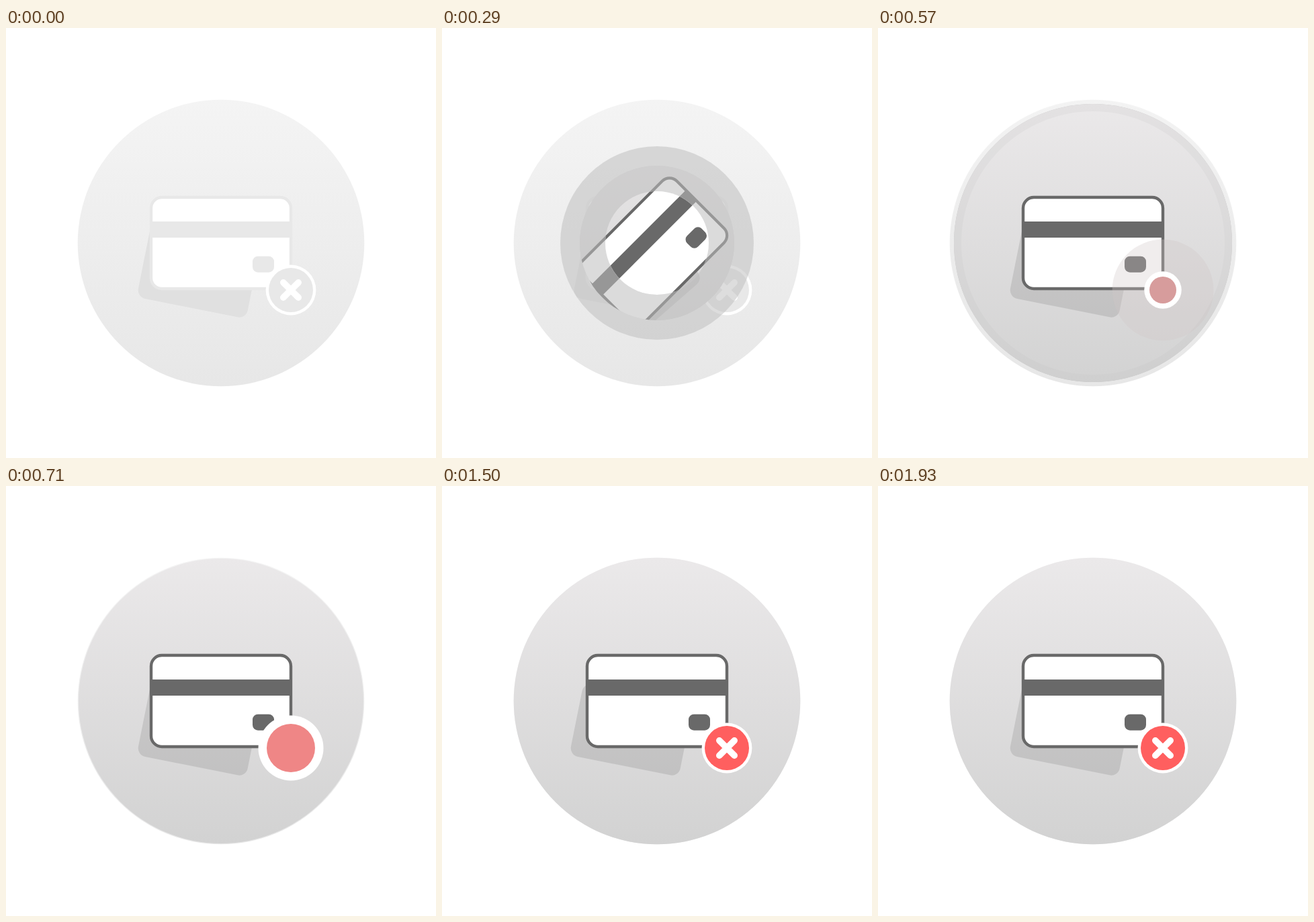
These frames come from a looping animation (640x640 px, 3140 ms). An HTML page:

```html
<!DOCTYPE html>
<html lang="en">
<head>
<meta charset="utf-8">
<title>Card declined</title>
<style>
  html, body { margin: 0; width: 100%; height: 100%; overflow: hidden; background: #fff; }
  svg { display: block; width: 100%; height: 100%; }
</style>
</head>
<body>
<svg viewBox="0 0 640 640">
  <defs>
    <linearGradient id="pale" x2="0" y2="1">
      <stop stop-color="#f4f4f4"/><stop offset="1" stop-color="#e7e7e7"/>
    </linearGradient>
    <linearGradient id="deep" x2="0" y2="1">
      <stop stop-color="#ebe9ea"/><stop offset="1" stop-color="#d2d2d2"/>
    </linearGradient>
    <clipPath id="midClip"><circle id="midClipCircle" cx="320" cy="320"/></clipPath>
    <clipPath id="coreClip"><circle id="coreClipCircle" cx="320" cy="320"/></clipPath>
    <rect id="shadowShape" x="-83" y="-55" width="166" height="110" rx="13"/>
    <g id="cardShape">
      <rect x="-104" y="-68" width="208" height="136" rx="16" fill="#fff" stroke="currentColor" stroke-width="4.4"/>
      <path d="M-104-20h208v24h-208z" transform="translate(0 -12)" fill="currentColor"/>
      <rect x="47" y="19.7" width="32" height="24" rx="8" fill="currentColor"/>
    </g>
    <path id="crossShape" d="M-11.2-11.2 11.2 11.2M11.2-11.2-11.2 11.2" stroke="#fff" stroke-width="9.6" stroke-linecap="round"/>
    <g id="scene">
      <circle cx="320" cy="320" r="213.3" fill="url(#deep)"/>
      <use id="shadow" href="#shadowShape" fill-opacity=".1"/>
      <use id="card" href="#cardShape" color="#696969"/>
      <g transform="translate(424 390)">
        <circle id="halo" fill="#cfc6c6"/>
        <circle id="rim" fill="#fff"/>
        <circle id="dot"/>
        <use id="cross" href="#crossShape"/>
      </g>
    </g>
  </defs>

  <circle cx="320" cy="320" r="213.3" fill="url(#pale)"/>
  <g id="inactive">
    <use href="#shadowShape" transform="translate(286.6 362.7) rotate(11.3)" fill="#e0e0e0"/>
    <use href="#cardShape" transform="translate(320 320)" color="#e8e8e8"/>
    <g transform="translate(424 390)">
      <circle r="37.4" fill="#fff"/><circle r="33" fill="#e8e8e8"/><use href="#crossShape"/>
    </g>
  </g>
  <circle id="outer" cx="320" cy="320" fill="#bebebe"/>
  <circle id="middle" cx="320" cy="320" fill="#bebebe"/>
  <g id="midScene" clip-path="url(#midClip)"><use href="#scene"/></g>
  <g id="coreScene" clip-path="url(#coreClip)"><use href="#scene"/></g>
</svg>
<script>
const LOOP = 3140, FPS = 14;
const RADII = [0, 41, 77, 115, 144, 170, 196, 207, 212, 213.3];
const el = id => document.getElementById(id);
const clamp = (v, lo = 0, hi = 1) => Math.min(hi, Math.max(lo, v));
const set = (id, attrs) => {
  for (const key in attrs) el(id).setAttribute(key, attrs[key]);
};

// Linear interpolation through [step, value] points.
function track(k, ...points) {
  if (k <= points[0][0]) return points[0][1];
  for (let i = 1; i < points.length; i++) {
    const [a, from] = points[i - 1], [b, to] = points[i];
    if (k <= b) return from + (to - from) * (k - a) / (b - a);
  }
  return points[points.length - 1][1];
}

const ripple = k => RADII[clamp(k, 0, RADII.length - 1)];
const pulse = (k, peak, height) => height * clamp(1 - Math.abs(k - peak) / 2);
const place = (x, y, angle, scale) => `translate(${x} ${y}) rotate(${angle}) scale(${scale})`;

function drawRipples(k) {
  const outer = ripple(k), middle = ripple(k - 1), core = ripple(k - 2);
  const spreading = k < 10;
  set("outer", { r: outer, opacity: spreading ? clamp(0.65 - 0.125 * (k - 3)) : 0 });
  set("middle", { r: middle, opacity: spreading ? 1 : 0 });
  set("midClipCircle", { r: middle });
  set("midScene", { opacity: spreading ? clamp(0.35 + 0.1 * (k - 3)) : 0 });
  set("coreClipCircle", { r: k > 10 ? 220 : core });
  set("inactive", { opacity: k > 10 ? 0 : 1 });
}

function drawCard(k) {
  const scale = track(k, [1, 0.66], [3, 0.855], [6, 1.155], [8, 1]);
  const shakeCard = pulse(k, 17, 6) + pulse(k, 24, 6);
  const shakeShadow = pulse(k, 21, 5) + pulse(k, 25, 10);
  set("card", { transform: place(
    320 + track(k, [3, -5], [6, -7], [8, 0]) + shakeCard,
    320 + track(k, [1, 30], [3, 19], [6, 1.5], [8, 0]),
    track(k, [1, -90], [7, 0]), scale) });
  set("shadow", { transform: place(
    286.6 + track(k, [6, 8], [8, 0]) - shakeShadow,
    362.7 + track(k, [6, 23], [8, 0]),
    track(k, [1, -86], [6, -11.4], [8, 11.3]),
    scale) });
}

function drawBadge(k) {
  const green = track(k, [6, 178], [10, 134], [13, 95]);
  set("halo", {
    r: track(k, [5, 0], [6, 18], [9, 104]),
    opacity: track(k, [6, 0.9], [7, 0.5], [9, 0.12], [10, 0])
  });
  set("rim", { r: track(k, [5, 0], [6, 7], [10, 48.5], [13, 37.4]) });
  set("dot", {
    r: track(k, [5, 0], [6, 4], [10, 36], [13, 33]),
    fill: `rgb(${track(k, [6, 190], [10, 239], [13, 255])},${green},${green})`
  });
  const grow = clamp((k - 16) / 4);
  set("cross", { transform: `scale(${grow})`, opacity: grow ? 1 : 0 });
}

function render(time) {
  const k = Math.floor((time % LOOP + 5) * FPS / 1000);
  drawRipples(k);
  drawCard(k);
  drawBadge(k);
}

const start = performance.now();
function tick() {
  render(performance.now() - start);
  requestAnimationFrame(tick);
}
tick();
</script>
</body>
</html>
```
